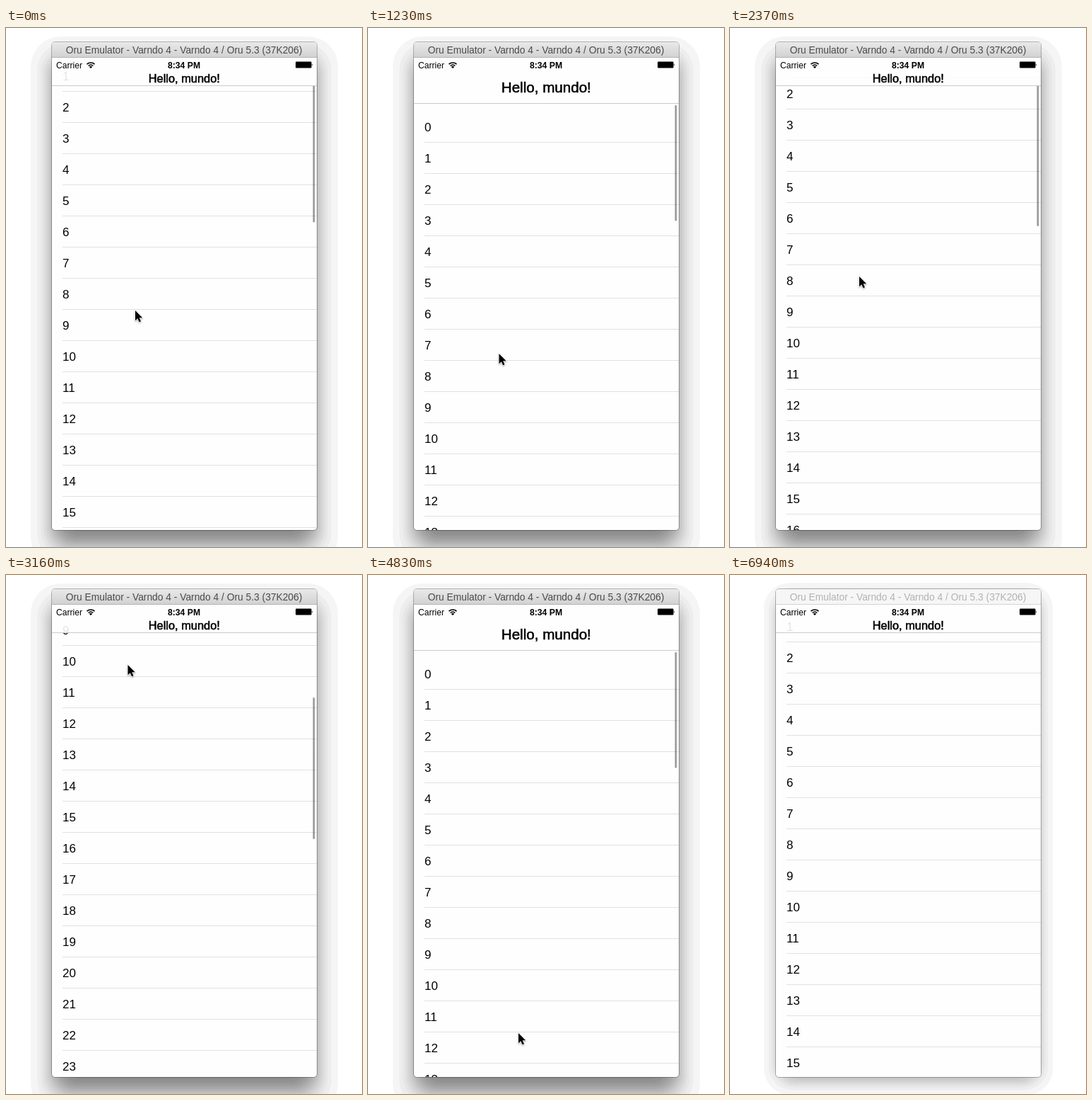
These frames come from a looping animation (504x733 px, 7040 ms). An HTML page:

```html
<!DOCTYPE html>
<html lang="en">
<head>
<meta charset="utf-8">
<title>Shrinking header</title>
<style>
  html, body { margin: 0; width: 100%; height: 100%; overflow: hidden; background: #fff; }
  svg { display: block; width: 504px; height: 733px; font-family: "Liberation Sans", Arial, sans-serif; }
  .mid { text-anchor: middle; }
</style>
</head>
<body>
<svg viewBox="0 0 504 733">
  <defs>
    <linearGradient id="barFill" x1="0" y1="0" x2="0" y2="1">
      <stop offset="0" stop-color="#e9e9e9"/>
      <stop offset="1" stop-color="#d2d2d2"/>
    </linearGradient>
    <clipPath id="frame"><rect x="65" y="20" width="375" height="689" rx="4.5"/></clipPath>
    <clipPath id="below"><rect id="belowRect" x="65" y="82" width="375" height="640"/></clipPath>
  </defs>
  <g id="activeShadow"></g>
  <g id="idleShadow"></g>
  <rect x="64.5" y="19.5" width="376" height="690" rx="5" fill="none" stroke="#000" stroke-opacity=".28"/>
  <g clip-path="url(#frame)">
    <rect x="65" y="20" width="375" height="689" fill="#fefefe"/>
    <g id="rows" font-size="17"></g>
    <g clip-path="url(#below)">
      <rect id="thumb" x="434.5" width="2.6" rx="1.3" fill="#000" fill-opacity=".4"/>
    </g>
    <rect id="header" x="65" y="62" width="375" fill="#fefefe" fill-opacity=".9"/>
    <rect x="65" y="42" width="375" height="20" fill="#fefefe"/>
    <rect id="edge" x="65" width="375" height="1" fill="#cbcbce"/>
    <text id="greeting" class="mid" x="252.3" stroke="#000" stroke-width=".55">Hello, mundo!</text>

    <text x="71" y="56.5" font-size="12.1">Carrier</text>
    <g fill="none" stroke="#000" stroke-width="1.7">
      <path d="M114.5 51.2A8 8 0 0 1 125.5 51.2"/>
      <path d="M116.7 53.5A4.8 4.8 0 0 1 123.3 53.5"/>
    </g>
    <path d="M120 57L117.9 54.9A3 3 0 0 1 122.1 54.9Z"/>
    <text class="mid" x="252" y="56.5" font-size="12.2" font-weight="bold">8:34 PM</text>
    <rect x="410" y="47.5" width="22.5" height="9" rx="1.3"/>
    <path d="M433.3 50.2Q435 52 433.3 53.8Z"/>

    <rect id="bar" x="65" y="20" width="375" height="21"/>
    <rect id="barLine" x="65" y="41" width="375" height="1"/>
    <text id="caption" class="mid" x="252" y="36" font-size="13.8">Oru Emulator - Varndo 4 - Varndo 4 / Oru 5.3 (37K206)</text>
  </g>
  <path id="pointer" d="M0 0V14.2L3.3 11.2L5.6 16.3L8 15.2L5.7 10.2H10.2Z" stroke="#fff" stroke-width="1.2"
    paint-order="stroke" style="filter:drop-shadow(0 1px 1px rgba(0,0,0,.35))"/>
</svg>
<script>
const LOOP = 7040, STEP = 88, ROW = 44;
const SMALL = 81, LARGE = 106;
// step, list top, pointer x, pointer y
const track = [
  [0, 1, 183, 399], [9, 115, 185, 453], [11, 117, 185.5, 460], [14, 117, 185.5, 460],
  [22, 30, 184, 385], [27, -18, 183, 351], [31, -125, 180, 255], [36, -341, 172.5, 127],
  [41, -470, 175, 112], [43, -480, 181, 150], [48, -6, 213, 642], [49, 106, 213, 655],
  [50, 116, 213, 655], [52, 118, 213, 650], [57, 117, 213, 645], [63, 17, 210, 563],
  [65, 6, 210, 552], [67, 6, 211, 565], [73, 6, 330, 745], [80, 6, 330, 745]
];
const $ = id => document.getElementById(id);
const clamp = (v, lo, hi) => Math.min(hi, Math.max(lo, v));
const mix = (a, b, p) => a + (b - a) * p;

function set(el, attrs) {
  for (const name in attrs) el.setAttribute(name, attrs[name]);
}

function add(parent, tag, attrs) {
  const el = document.createElementNS("http://www.w3.org/2000/svg", tag);
  set(el, attrs);
  parent.append(el);
  return el;
}

// Soft shadow as nested bands of equal tone, widest first
function shadow(parent, drop, sigma, max) {
  for (let a = 0.02; a < max * 0.95; a += 0.03) {
    const grow = sigma * Math.log(max / a - 1) / 1.702;
    const tone = Math.round(255 * (1 - a - 0.02));
    add(parent, "rect", {
      x: 65 - grow, y: 20 + drop - grow, width: 375 + 2 * grow, height: 689 + 2 * grow,
      rx: 30 + grow * 0.4, fill: `rgb(${tone},${tone},${tone})`
    });
  }
}

shadow($("activeShadow"), 22, 16, 0.5);
shadow($("idleShadow"), 8, 11, 0.3);
for (let i = 0; i < 50; i++) {
  add($("rows"), "text", { x: 80, y: i * ROW + 29 }).textContent = i;
  add($("rows"), "rect", { x: 80, y: (i + 1) * ROW, width: 360, height: 1, fill: "#e1e1e3" });
}

function pose(step) {
  const i = track.findIndex(key => key[0] > step);
  const a = track[i - 1], b = track[i];
  const p = (step - a[0]) / (b[0] - a[0]);
  return a.map((v, n) => mix(v, b[n], p));
}

function draw(step) {
  const [, y, px, py] = pose(step);
  const top = Math.round(y);
  const bottom = clamp(top, SMALL, LARGE);
  const open = (bottom - SMALL) / (LARGE - SMALL);
  const active = step < 79;

  set($("rows"), { transform: `translate(0 ${top})` });
  set($("header"), { height: bottom - 62 });
  set($("edge"), { y: bottom });
  set($("greeting"), { y: 77 + 14 * open, "font-size": 16.4 + 4.2 * open });

  const end = mix(274.9 - 0.288 * Math.min(top, SMALL), 272.5, open);
  const start = Math.max(end - 200, bottom + 3 * open);
  set($("belowRect"), { y: bottom });
  set($("thumb"), { y: start, height: end - start, opacity: clamp((72 - step) / 6, 0, 1) });

  set($("pointer"), { transform: `translate(${px} ${py})` });
  set($("activeShadow"), { visibility: active ? "visible" : "hidden" });
  set($("idleShadow"), { visibility: active ? "hidden" : "visible" });
  set($("bar"), { fill: active ? "url(#barFill)" : "#f6f6f6" });
  set($("barLine"), { fill: active ? "#b4b4b4" : "#d4d4d4" });
  set($("caption"), { fill: active ? "#4b4b4b" : "#b2b2b2" });
}

const begin = performance.now();
function tick() {
  const t = (performance.now() - begin) % LOOP;
  draw(Math.min(79, Math.floor((t + 20) / STEP)));
  requestAnimationFrame(tick);
}
tick();
</script>
</body>
</html>
```
